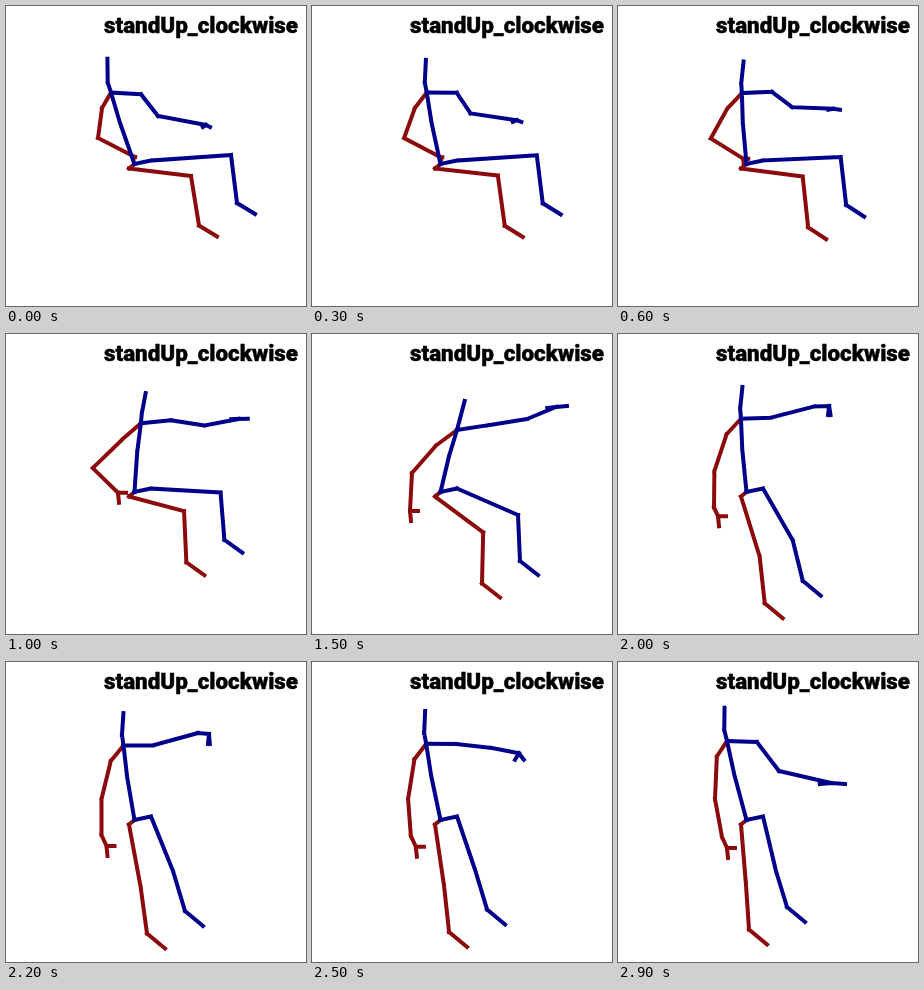
Animation of 300x300 px, one loop 3 s. Source, as an HTML page:

```html
<!DOCTYPE html>
<html lang="en">
<head>
<meta charset="utf-8">
<title>standUp_clockwise</title>
<style>
  html, body { margin: 0; width: 100%; height: 100%; overflow: hidden; background: #fff; }
  svg { display: block; width: 300px; height: 300px; }
  text { font: 900 22.4px Roboto, "Open Sans", sans-serif; stroke: #000; stroke-width: .4; }
  path { fill: none; stroke-width: 4; stroke-linecap: square; }
  .left { stroke: #00008b; }
  .right { stroke: #8b0a0c; }
</style>
</head>
<body>
<svg viewBox="0 0 300 300">
  <text x="195" y="27" text-anchor="middle">standUp_clockwise</text>
  <path id="rightLeg" class="right"/>
  <path id="rightArm" class="right"/>
  <path id="leftLeg" class="left"/>
  <path id="spine" class="left"/>
  <path id="leftArm" class="left"/>
</svg>
<script>
const LOOP = 3000, STEP = 100;
const LEAN = 1500, RISE = 2200, STAND = 2900;
const pelvis = [128.5, 158], leftHip = [145, 154.5], rightHip = [123, 162.5];

const clamp = u => Math.min(1, Math.max(0, u));
const smooth = u => u * u * (3 - 2 * u);
const slow = u => smooth(u) ** 2;
const early = u => 1 - (1 - u) ** 1.25;
const late = u => u ** 3;
const easeOut = u => Math.sin(u * Math.PI / 2);
const mix = (a, b, u) => a + (b - a) * u;
const add = (a, b, k = 1) => [a[0] + b[0] * k, a[1] + b[1] * k];

// A joint passes through four poses: sitting, leaning, rising, standing.
// Leaning forward has its own easing for x and y.
function joint(easeX, easeY, sit, lean, rise, stand) {
  const go = (a, b, ex, ey, u) => [mix(a[0], b[0], ex(u)), mix(a[1], b[1], ey(u))];
  return t =>
    t < LEAN ? go(sit, lean, easeX, easeY, t / LEAN) :
    t < RISE ? go(lean, rise, smooth, easeOut, (t - LEAN) / (RISE - LEAN)) :
    go(rise, stand, smooth, smooth, clamp((t - RISE) / (STAND - RISE)));
}

const chestAt = joint(early, late, [105, 86.5], [145, 96], [117.5, 83.5], [109, 79]);
const kneeAt  = joint(slow, late, [225, 149], [206, 181], [167, 209], [158, 209]);
const ankleAt = joint(slow, late, [231, 197], [208, 227], [179, 249], [169, 245]);
const leftElbowAt  = joint(smooth, smooth, [152, 110], [215, 85], [192, 71], [161, 109]);
const leftHandAt   = joint(smooth, smooth, [200, 119], [244, 73], [203, 72], [213, 121]);
const leftTipAt    = joint(smooth, smooth, [4, 2], [11, -1], [-1, 10], [14, 1]);
const rightElbowAt = joint(slow, late, [92, 132], [100, 139], [95.5, 137], [97, 137]);
const rightWristAt = joint(slow, late, [129, 151], [98, 177], [95.5, 173], [104, 175]);

// Separate bones, so each one keeps its own square ends.
function bones(...pts) {
  const f = p => p.map(v => v.toFixed(2)).join(" ");
  return pts.slice(1).map((p, i) => `M${f(pts[i])}L${f(p)}`).join("");
}

function draw(id, d) {
  document.getElementById(id).setAttribute("d", d);
}

function drawTrunk(chest, lean) {
  const mid = add(pelvis, [chest[0] - pelvis[0], chest[1] - pelvis[1]], .58);
  const neck = add(chest, [lean, chest[1] - pelvis[1]], .14);
  const head = add(chest, [3 + .28 * lean, -31 + .12 * lean]);
  draw("spine", bones(pelvis, add(mid, [-1, 0]), chest, neck, head));
}

// The right leg follows the left one, set off by the view angle.
function drawLegs(t) {
  const p = t / STAND, knee = kneeAt(t), ankle = ankleAt(t);
  const rightKnee = add(knee, [-40 + 10 * p, 21 - 7 * p]);
  const rightAnkle = add(ankle, [-38, 22.5]);
  const foot = [18, 11 + 4 * smooth(clamp(t / RISE))];
  draw("leftLeg", bones(pelvis, leftHip, knee, ankle, add(ankle, foot)));
  draw("rightLeg", bones(pelvis, rightHip, rightKnee, rightAnkle, add(rightAnkle, foot)));
}

function drawLeftArm(t, chest, lean) {
  const shoulder = add(chest, [30, -2 - .16 * lean]);
  const hand = leftHandAt(t), [dx, dy] = leftTipAt(t);
  const thumb = add(hand, [-.8 * dx, Math.abs(dy)]);
  draw("leftArm", bones(chest, shoulder, leftElbowAt(t), hand, add(hand, [dx, dy])) + bones(hand, thumb));
}

function drawRightArm(t, chest, lean) {
  const shoulder = add(chest, [-16 - .3 * lean, 15.5]);
  const swing = Math.exp(-(((t - 900) / 150) ** 2));
  const elbow = add(rightElbowAt(t), [-15, 0], swing);
  const wrist = rightWristAt(t);
  const hand = add(wrist, [5, 11], smooth(clamp((t - LEAN) / (RISE - LEAN))));
  const open = smooth(clamp(t / 1000));
  draw("rightArm", bones(chest, shoulder, elbow, wrist, hand, add(hand, [1, 10], open))
    + bones(hand, add(hand, [8, 0], open)));
}

function render(t) {
  const chest = chestAt(t), lean = chest[0] - pelvis[0];
  drawTrunk(chest, lean);
  drawLegs(t);
  drawLeftArm(t, chest, lean);
  drawRightArm(t, chest, lean);
}

const start = performance.now();
function tick() {
  const t = (performance.now() - start) % LOOP;
  render(Math.floor(t / STEP) * STEP);
  requestAnimationFrame(tick);
}
tick();
</script>
</body>
</html>
```
